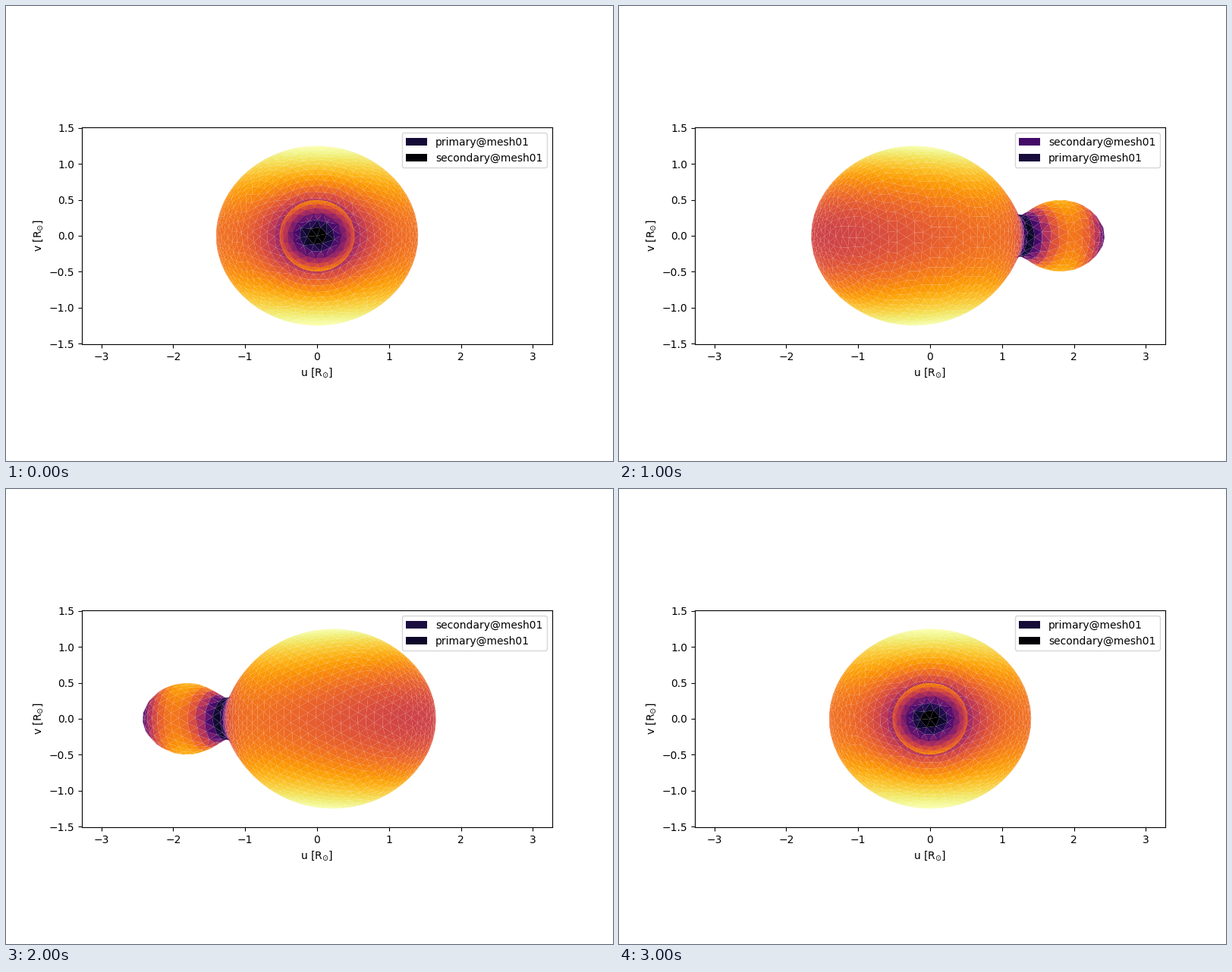
Recreate the animation shown at these times as a matplotlib script. Size 800 px wide and 600 px high, loop 3.1 s.

```python
import numpy as np
import matplotlib.pyplot as plt
from matplotlib.animation import FuncAnimation
from matplotlib.collections import PolyCollection
from matplotlib.patches import Patch
from matplotlib.tri import Triangulation

FRAMES = 31
Q = 0.114          # mass ratio
SMA = 2.312        # separation in solar radii
OMEGA = 1.949      # potential of the common envelope
EDGE = 0.135 / SMA  # triangle edge length
rng = np.random.default_rng(4)


def potential(x, y, z):
    r1 = np.sqrt(x**2 + y**2 + z**2)
    r2 = np.sqrt((x - 1)**2 + y**2 + z**2)
    return 1 / r1 + Q * (1 / r2 - x) + 0.5 * (1 + Q) * (x**2 + y**2)


def outward_slope(p):
    """Negative gradient of the potential, pointing out of the surface."""
    x, y, z = p.T
    k1 = (x**2 + y**2 + z**2)**-1.5
    k2 = Q * ((x - 1)**2 + y**2 + z**2)**-1.5
    gx = x * k1 + (x - 1) * k2 + Q - (1 + Q) * x
    gy = y * (k1 + k2 - 1 - Q)
    gz = z * (k1 + k2)
    return np.column_stack([gx, gy, gz])


def bisect(f, inside, outside):
    for _ in range(50):
        mid = (inside + outside) / 2
        is_in = f(mid) > OMEGA
        inside = np.where(is_in, mid, inside)
        outside = np.where(is_in, outside, mid)
    return (inside + outside) / 2


def radius(x, phi):
    c, s = np.cos(phi), np.sin(phi)
    return bisect(lambda r: potential(x, r * c, r * s),
                  np.full_like(x, 1e-6), np.full_like(x, 0.75))


def build_mesh():
    tip = float(bisect(lambda x: potential(x, 0, 0), 1.05, 1.35))
    back = float(bisect(lambda x: potential(x, 0, 0), -0.4, -0.75))

    # meridian from the far tip of the secondary to the back of the primary
    t = np.linspace(0, np.pi, 4000)[1:-1]
    mx = (tip + back) / 2 + (tip - back) / 2 * np.cos(t)
    mr = radius(mx, np.full_like(mx, np.pi / 4))
    ds = np.hypot(np.diff(mx), np.diff(mr))
    arc = mr[0] + np.concatenate([[0], np.cumsum(ds)])
    sigma = np.concatenate([[0], np.cumsum(ds / ((mr[1:] + mr[:-1]) / 2))])

    length = arc[-1] + mr[-1]
    rows = int(round((length - 2 * EDGE) / (0.866 * EDGE))) + 1
    ring_s, ring_phi = [], []
    for k, s in enumerate(np.linspace(EDGE, length - EDGE, rows)):
        n = max(6, int(round(2 * np.pi * np.interp(s, arc, mr) / EDGE)))
        step = 2 * np.pi / n
        wobble = 0.09 if 0 < k < rows - 1 else 0
        shift = 0.5 * (k % 2) + 0.13
        ring_phi.append(step * (np.arange(n) + shift + rng.uniform(-0.07, 0.07, n)))
        ring_s.append(s + EDGE * wobble * rng.uniform(-1, 1, n))
    first, last = len(ring_s[0]), len(ring_s[-1])
    s, phi = np.concatenate(ring_s), np.concatenate(ring_phi)
    count = len(s)

    # Delaunay on a conformal unrolling, periodic in phi
    turns = np.concatenate([phi - 2 * np.pi, phi, phi + 2 * np.pi])
    tri = Triangulation(np.tile(np.interp(s, arc, sigma), 3), turns).triangles
    mid = turns[tri].mean(axis=1)
    tri = tri[(mid >= 0) & (mid < 2 * np.pi)] % count

    def fan(start, n, pole):
        i = np.arange(n)
        return np.column_stack([np.full(n, pole), start + i, start + (i + 1) % n])

    tri = np.vstack([fan(0, first, count), tri, fan(count - last, last, count + 1)])
    x = np.interp(s, arc, mx)
    r = radius(x, phi)
    pts = np.column_stack([x, r * np.cos(phi), r * np.sin(phi)])
    pts = np.vstack([pts, [tip, 0, 0], [back, 0, 0]])

    between = (mx > 0.4) & (mx < 0.9)
    neck = mx[between][np.argmin(mr[between])]
    return pts, tri, neck


points, triangles, neck = build_mesh()
corners = points[triangles]
centers = corners.mean(axis=1)
normals = np.cross(corners[:, 1] - corners[:, 0], corners[:, 2] - corners[:, 0])
normals *= np.sign((normals * outward_slope(centers)).sum(axis=1))[:, None]

# gravity darkening
teff = np.linalg.norm(outward_slope(points), axis=1)**0.08
teff = teff[triangles].mean(axis=1)
colors = plt.get_cmap("inferno")((teff - teff.min()) / np.ptp(teff))

barycenter = np.array([Q / (1 + Q), 0, 0])
corners = (corners - barycenter) * SMA
stars = {"primary": centers[:, 0] <= neck, "secondary": centers[:, 0] > neck}

fig, ax = plt.subplots(figsize=(8, 6), dpi=100)
ax.set_xlim(-3.27, 3.27)
ax.set_ylim(-1.507, 1.507)
ax.set_aspect("equal")
ax.set_xlabel(r"u [$\mathrm{R_{\odot}}$]")
ax.set_ylabel(r"v [$\mathrm{R_{\odot}}$]")
meshes = {}
for name in stars:
    meshes[name] = PolyCollection([], edgecolors="none", linewidths=0)
    ax.add_collection(meshes[name], autolim=False)


def update(i):
    theta = 2 * np.pi * i / (FRAMES - 1)
    sin, cos = np.sin(theta), np.cos(theta)
    u = corners[..., 0] * sin + corners[..., 1] * cos
    depth = (corners[..., 0] * cos - corners[..., 1] * sin).mean(axis=1)
    facing = normals[:, 0] * cos - normals[:, 1] * sin > 0
    verts = np.stack([u, corners[..., 2]], axis=-1)

    # the farther star is drawn and listed first
    order = ["primary", "secondary"] if cos > 0 else ["secondary", "primary"]
    handles = []
    for z, name in enumerate(order):
        seen = np.flatnonzero(stars[name] & facing)
        seen = seen[np.argsort(depth[seen])]
        meshes[name].set_verts(verts[seen])
        meshes[name].set_facecolor(colors[seen])
        meshes[name].set_zorder(1 + 0.1 * z)
        lead = seen[np.argmax(centers[seen, 0])]
        handles.append(Patch(facecolor=colors[lead], edgecolor="none",
                             label=name + "@mesh01"))
    ax.legend(handles=handles, loc="upper right")
    return list(meshes.values())


anim = FuncAnimation(fig, update, frames=FRAMES, interval=100,
                     repeat=True, repeat_delay=0, blit=False)
plt.show()
```
